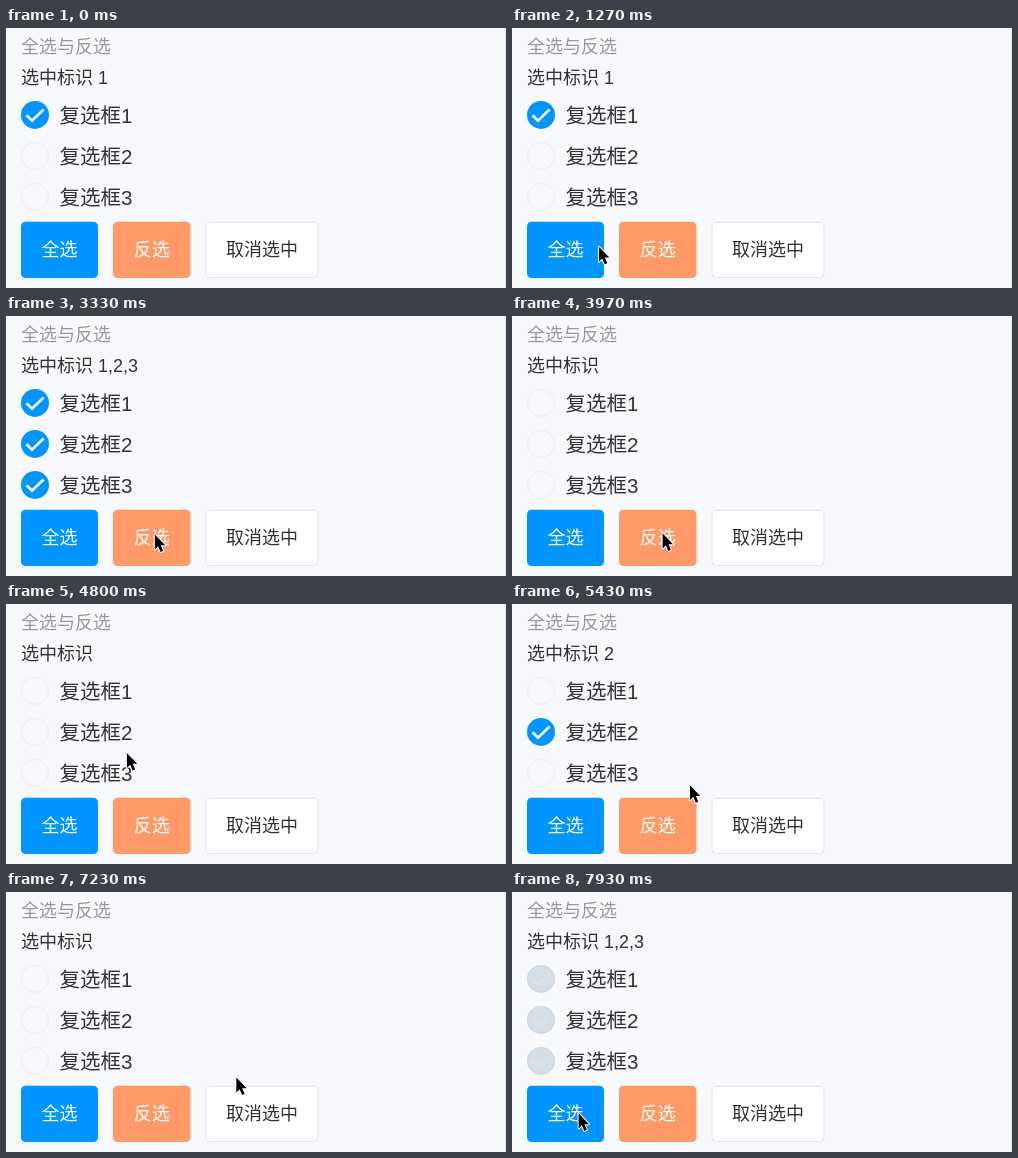
These frames come from a looping animation (500x260 px, 8 s). An HTML page with a canvas:

```html
<!DOCTYPE html>
<html lang="zh-CN">
<head>
<meta charset="utf-8">
<style>
  html, body { margin: 0; width: 100%; height: 100%; overflow: hidden; background: #f8f9fc; }
  canvas { display: block; width: 500px; height: 260px; }
</style>
</head>
<body>
<canvas id="stage"></canvas>
<script>
const LOOP = 8000;
const END = 7930; // the picture rests from here until the loop restarts
const FADE = 145;
const FONT = '"Liberation Sans", "Noto Sans CJK SC", "Noto Sans CJK", sans-serif';
const canvas = document.getElementById('stage');
const ctx = canvas.getContext('2d');
const dpr = window.devicePixelRatio || 1;
canvas.width = 500 * dpr;
canvas.height = 260 * dpr;

const selections = [
  { at: -LOOP, ids: '1' },
  { at: 2200, ids: '1,2,3' },
  { at: 3700, ids: '' },
  { at: 5230, ids: '2' },
  { at: 6100, ids: '' },
  { at: 7900, ids: '1,2,3' }
];

const smooth = u => u * u * (3 - 2 * u);
const easeOut = u => 1 - (1 - u) ** 2.2;
const clamp = u => Math.min(1, Math.max(0, u));

// Pointer stops; bow bends the way between them up or down
const edge = [490, 247], selectAll = [66, 221], invert = [150, 217],
      second = [110, 125], clear = [253, 215];
const moves = [
  { at: 500, end: 1530, from: edge, to: selectAll, ease: easeOut, bow: -5.5 },
  { at: 2600, end: 3400, from: selectAll, to: invert, ease: smooth, bow: 4 },
  { at: 4400, end: 5000, from: invert, to: second, ease: smooth, bow: 0 },
  { at: 5230, end: 6030, from: second, to: clear, ease: easeOut, bow: 19 },
  { at: 7070, end: 7800, from: clear, to: selectAll, ease: smooth, bow: -48 }
];

const latest = (list, t) => list.filter(e => e.at <= t).pop();

// Checks fade in at once, and fade out a little after the label changes
function opacity(id, t) {
  let a = 0;
  for (const s of selections) {
    const on = s.ids.includes(id);
    const u = clamp((t - s.at - (on ? 10 : 75)) / FADE);
    a += ((on ? 1 : 0) - a) * u;
  }
  return a;
}

function pointerAt(m, t) {
  const u = clamp((t - m.at) / (m.end - m.at)), p = m.ease(u);
  const mix = i => m.from[i] + (m.to[i] - m.from[i]) * p;
  return [mix(0), mix(1) + m.bow * Math.sin(Math.PI * u)];
}

// Text placed by the vertical centre of its characters
function text(str, x, y, size, color, align = 'left') {
  ctx.font = size + 'px ' + FONT;
  ctx.textAlign = align;
  ctx.fillStyle = color;
  ctx.fillText(str, x, y + size * .38);
}

function button(str, x, w, fill, color, border) {
  const inset = border ? .5 : 0;
  ctx.beginPath();
  ctx.roundRect(x + inset, 193.7 + inset, w - 2 * inset, 56.3 - 2 * inset, 4.5);
  ctx.fillStyle = fill;
  ctx.fill();
  if (border) {
    ctx.strokeStyle = border;
    ctx.lineWidth = 1;
    ctx.stroke();
  }
  text(str, x + w / 2, 221.5, 18, color, 'center');
}

function disc(y, r) {
  ctx.beginPath();
  ctx.arc(29, y, r, 0, Math.PI * 2);
}

function checkbox(id, y, a) {
  disc(y, 13.5);
  ctx.strokeStyle = `rgba(236,238,242,${1 - a})`;
  ctx.lineWidth = 1;
  ctx.stroke();
  if (a > 0) {
    const tint = Math.sqrt(a);
    disc(y, 14);
    ctx.fillStyle = `rgba(0,${149 * tint},${255 * tint},${a})`;
    ctx.fill();
    ctx.beginPath();
    ctx.moveTo(20.5, y + .4);
    ctx.lineTo(26, y + 5.7);
    ctx.lineTo(37.6, y - 5.4);
    ctx.strokeStyle = `rgba(255,255,255,${a})`;
    ctx.lineWidth = 2.6;
    ctx.stroke();
  }
  text('复选框' + id, 53.5, y, 20.5, '#333');
}

function pointer(x, y) {
  ctx.save();
  ctx.translate(x + .6, y + .3);
  ctx.scale(.88, .92);
  ctx.beginPath();
  [[0, 0], [0, 16.4], [3.8, 12.9], [6.5, 19.2], [9.4, 18], [6.7, 11.8], [11.8, 11.8]]
    .forEach(p => ctx.lineTo(...p));
  ctx.closePath();
  ctx.lineJoin = 'round';
  ctx.strokeStyle = '#fff';
  ctx.lineWidth = 2.2;
  ctx.stroke();
  ctx.fillStyle = '#000';
  ctx.fill();
  ctx.restore();
}

function draw(t) {
  ctx.setTransform(dpr, 0, 0, dpr, 0, 0);
  ctx.fillStyle = '#f8f9fc';
  ctx.fillRect(0, 0, 500, 260);
  ctx.fillStyle = '#e4e5e8';
  ctx.fillRect(499, 0, 1, 260);

  text('全选与反选', 15, 18, 18, '#999');
  text('选中标识 ' + latest(selections, t).ids, 15, 49.5, 18, '#333');
  ['1', '2', '3'].forEach((id, i) => checkbox(id, 86.9 + i * 41, opacity(id, t)));

  button('全选', 15, 77, '#0095ff', '#fff');
  button('反选', 107, 77.5, '#ff9a68', '#fff');
  button('取消选中', 199.5, 113, '#fff', '#333', '#e2e3e6');

  const move = latest(moves, t);
  if (move) pointer(...pointerAt(move, t));
}

const start = performance.now();
function frame() {
  draw(Math.min((performance.now() - start) % LOOP, END));
  requestAnimationFrame(frame);
}
frame();
</script>
</body>
</html>
```
